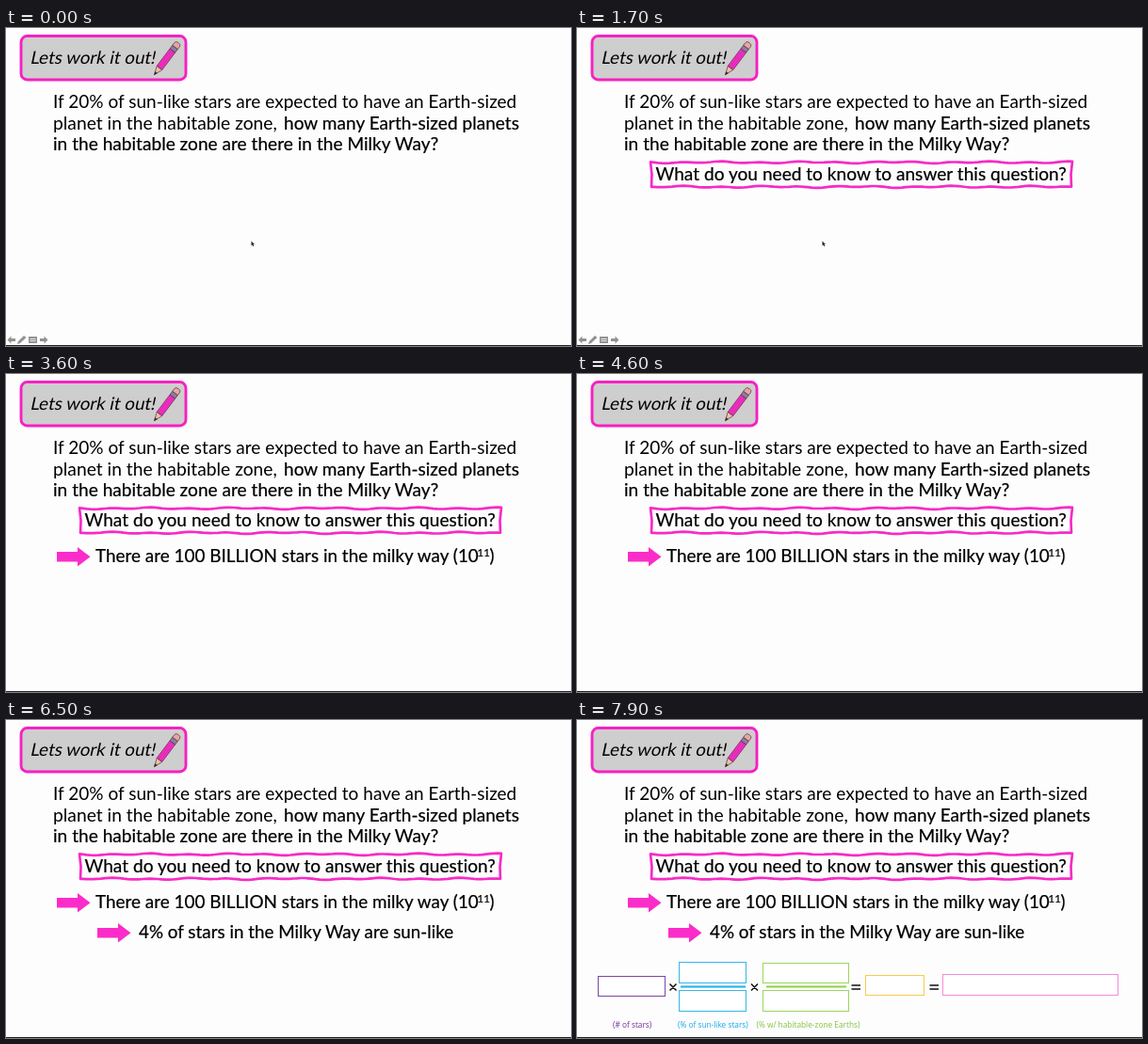
An HTML page for the animation above (8 s loop, 600x338 px).

```html
<!DOCTYPE html>
<html lang="en">
<head>
<meta charset="utf-8">
<title>Lets work it out!</title>
<style>
html, body { margin: 0; width: 100%; height: 100%; overflow: hidden; background: #fdfdfd; }
svg { display: block; width: 100vw; height: 100vh; }
text { font-family: Lato, "Open Sans", sans-serif; font-variant-ligatures: none; fill: #000; white-space: pre; }
.medium { stroke: #000; stroke-width: .22; }
.label text { font-family: "Open Sans", "Noto Sans", sans-serif; font-size: 8.3px; }
</style>
</head>
<body>
<svg viewBox="0 0 600 338">
  <defs>
    <path id="arrow" d="M0 5H22V0L35.500 10.200L22 20.400V15.400H0Z" fill="#fb2cc9"/>
  </defs>
  <rect width="600" height="338" fill="#fdfdfd"/>
  <rect y="337" width="600" height="1" fill="#222"/>

  <rect x="16" y="8.500" width="175" height="46.500" rx="6.500" fill="#cecece" stroke="#f621c2" stroke-width="2.900"/>
  <text font-size="18.700" transform="translate(25.200 38) skewX(-12)">Lets work it out!</text>
  <g transform="translate(157.600 49.600) rotate(-53)" stroke="#4a2540" stroke-width=".6" stroke-linejoin="round">
    <path d="M0 0L9 -3.500V3.500Z" fill="#e9c49a"/>
    <path d="M0 0L3 -1.200V1.200Z" fill="#222"/>
    <rect x="9" y="-3.500" width="23" height="7" fill="#f22fc2"/>
    <path d="M9 -1.200H32M9 1.200H32" stroke="#c81ea0" stroke-width=".5"/>
    <rect x="32" y="-3.500" width="4.500" height="7" fill="#8d7c9c"/>
    <path d="M36.500 -3.500H40Q42.500 -3.500 42.500 0T40 3.500H36.500Z" fill="#e9a5a0"/>
  </g>

  <text x="50" y="84.700" font-size="19.050">If 20% of sun-like stars are expected to have an Earth-sized</text>
  <text x="50" y="107.500" font-size="19.250">planet in the habitable zone,</text>
  <text class="medium" x="295" y="107.500" font-size="19.080">how many Earth-sized planets</text>
  <text class="medium" x="50" y="129.800" font-size="19.130">in the habitable zone are there in the Milky Way?</text>

  <g id="ask">
    <path id="frame" fill="none" stroke="#f62bc6" stroke-width="2.700" stroke-linejoin="round"/>
    <text class="medium" x="83.500" y="162" font-size="19.120">What do you need to know to answer this question?</text>
  </g>

  <g id="fact1">
    <use href="#arrow" x="54" y="184"/>
    <g class="medium">
      <text x="95" y="200.300" font-size="18.900">There are 100 BILLION stars in the milky way (10</text>
      <text x="500.500" y="193.500" font-size="11.500">11</text>
      <text x="513.500" y="200.300" font-size="18.900">)</text>
    </g>
  </g>

  <g id="fact2">
    <use href="#arrow" x="97" y="216"/>
    <text class="medium" x="141" y="232.200" font-size="18.830">4% of stars in the Milky Way are sun-like</text>
  </g>

  <g id="sum">
    <g id="boxes" fill="#fff"></g>
    <path d="M110 283.500H179" stroke="#1fb0ea" stroke-width="2"/>
    <path d="M201 283.500H286" stroke="#8fd14a" stroke-width="2"/>
    <path d="M98.500 280.500l7 7m0 -7l-7 7M185 280.500l7 7m0 -7l-7 7M291.500 282h9.500m-9.500 4h9.500M374.500 282h9.500m-9.500 4h9.500" stroke="#111" stroke-width="1.500"/>
    <g class="label">
      <text x="38" y="327" style="fill:#7030a0">(# of stars)</text>
      <text x="107" y="327" style="fill:#14a9e6">(% of sun-like stars)</text>
      <text x="190.500" y="327" style="fill:#80c342">(% w/ habitable-zone Earths)</text>
    </g>
  </g>

  <path id="cursor" d="M260.500 226.500V231.500L261.600 230.500L262.500 232.200L263.300 231.700L262.500 230.100L264 230Z" fill="#222"/>
  <g id="tools" fill="#929292">
    <path d="M1.500 331.500L5.500 327.500V330H10V333H5.500V335.500Z"/>
    <path d="M12 336L13 333L19 327L21.500 329L15 335Z"/>
    <path d="M24 328H33V335H24Z"/>
    <path d="M25.500 330.500H31.500M25.500 332.500H31.500" stroke="#fff" stroke-width=".8"/>
    <path d="M44.500 331.500L40.500 327.500V330H36V333H40.500V335.500Z"/>
  </g>
</svg>
<script>
const LOOP = 8000;
const el = id => document.getElementById(id);

// Hand-drawn frame: straight sides with a gentle wobble.
function wobblyFrame(x0, y0, x1, y1) {
  const pts = [];
  const wave = x => Math.sin(x / 6.5) * .6 + Math.sin(x / 15 + 1) * .5;
  for (let x = x0; x <= x1; x += 4) pts.push([x, y0 + wave(x)]);
  pts.push([x1 - 1.5, (y0 + y1) / 2]);
  for (let x = x1 - 1; x > x0 + 2; x -= 4) pts.push([x, y1 + wave(x + 40)]);
  pts.push([x0 + 1, y1], [x0 + 1.5, (y0 + y1) / 2]);
  return "M" + pts.map(p => p.map(v => v.toFixed(1)).join(" ")).join("L") + "Z";
}

function addBox(x, y, w, h, color) {
  const box = document.createElementNS("http://www.w3.org/2000/svg", "rect");
  Object.entries({ x, y, width: w, height: h, stroke: color })
    .forEach(([k, v]) => box.setAttribute(k, v));
  el("boxes").append(box);
}

el("frame").setAttribute("d", wobblyFrame(78, 142.8, 526, 168.8));
addBox(22.5, 272.5, 71, 21, "#7d45a8");
addBox(108.5, 257.5, 71, 22, "#35b6ea");
addBox(108.5, 287.5, 71, 22, "#35b6ea");
addBox(197.5, 258.5, 91, 21, "#9bd65c");
addBox(197.5, 287.5, 91, 22, "#9bd65c");
addBox(306.5, 271.5, 62, 21, "#f5cb52");
addBox(388.5, 270.5, 186, 22, "#f58bd8");

const starts = { ask: 1700, fact1: 3500, fact2: 5500, sum: 7600 };

function draw(t) {
  for (const id in starts) el(id).style.display = t >= starts[id] ? "" : "none";
  el("cursor").style.display = t < 2400 ? "" : "none";
  const step = Math.max(0, Math.floor((t - 2300) / 100));
  el("tools").style.opacity = Math.max(0, 1 - step / 3);
}

const begin = performance.now();
function tick() {
  draw((performance.now() - begin) % LOOP);
  requestAnimationFrame(tick);
}
draw(0);
tick();
</script>
</body>
</html>
```
